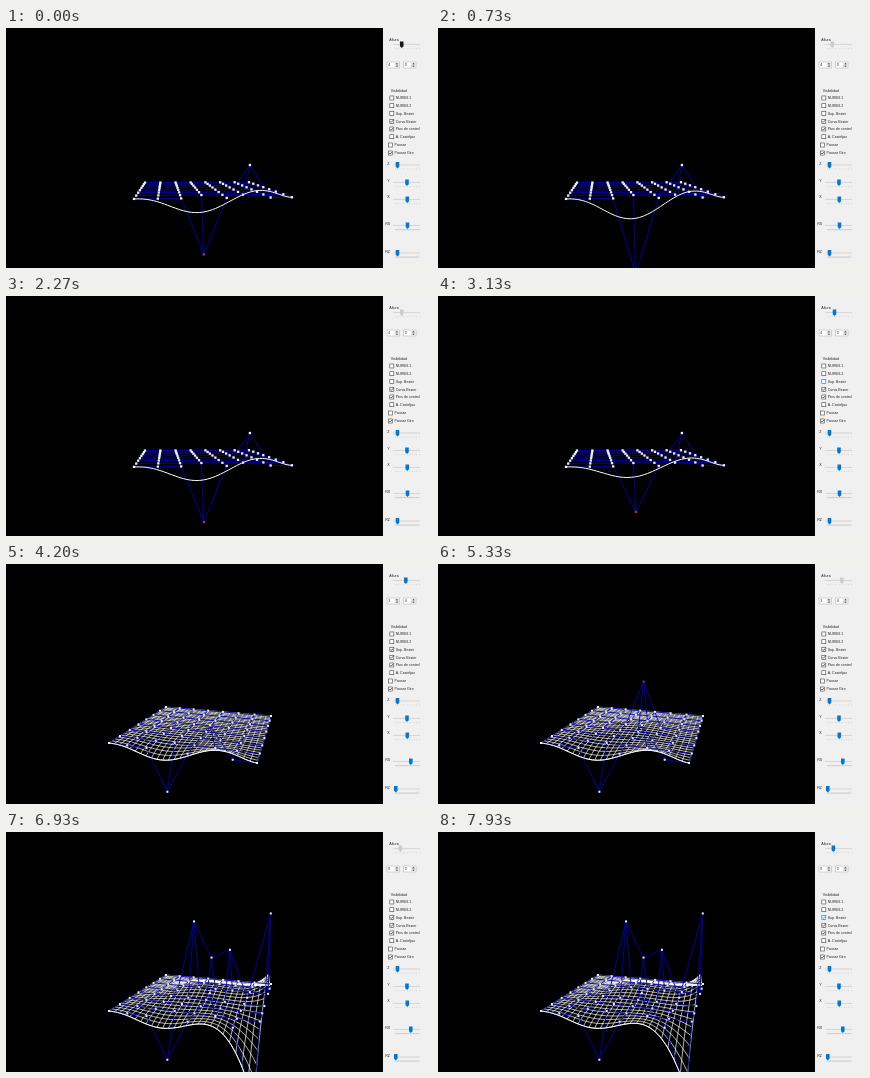
An HTML page with a canvas for the animation above (8000 ms loop, 426x240 px).

```html
<!DOCTYPE html>
<html lang="es">
<head>
<meta charset="utf-8">
<title>Superficie Bezier</title>
<style>
html, body { margin: 0; width: 100%; height: 100%; overflow: hidden; background: #000; }
canvas { display: block; width: 426px; height: 240px; }
</style>
</head>
<body>
<canvas id="stage" width="426" height="240"></canvas>
<script>
const ctx = document.getElementById('stage').getContext('2d');
const LOOP = 8000, STEP = 200 / 3, N = 8, DIV = 25, PANEL = 377;
const BLUE = '#0078d7';

// Plane corners: front left, front right, back right, back left
const VIEW_A = [[128, 170.9], [286, 169.3], [243, 154.2], [139, 154.6]];
const VIEW_B = [[103, 179], [251, 199], [265, 152], [160, 143]];

// Height of each moved control point: column, row, [time, height] keys
const MOVES = [
  { u: 3, v: 0, keys: [[200, -57], [700, -80], [1300, -100], [1500, -100], [2100, -62], [2600, -46]] },
  { u: 5, v: 0, keys: [[0, 32]] },
  { u: 4, v: 4, keys: [[4600, 0], [5250, 57], [5350, 57], [5480, 47]] },
  { u: 3, v: 4, keys: [[5600, 0], [5880, 91]] },
  { u: 5, v: 4, keys: [[6000, 0], [6220, 58]] },
  { u: 7, v: 4, keys: [[6330, 0], [6600, 102]] },
  { u: 7, v: 0, keys: [[6720, 0], [6900, -92], [7000, -92], [7300, -62]] }
];

// [start, index into MOVES, drag start, drag end]
const PICKS = [
  [0, 0, 200, 2650], [3900, 2, 4600, 5480], [5530, 3, 5600, 5900],
  [5930, 4, 6000, 6240], [6270, 5, 6330, 6620], [6660, 6, 6720, 7350]
];
const SURFACE_ON = 3200;

function track(keys, t) {
  if (t <= keys[0][0]) return keys[0][1];
  for (let i = 1; i < keys.length; i++) {
    const [t0, a] = keys[i - 1], [t1, b] = keys[i];
    if (t < t1) return a + (b - a) * (t - t0) / (t1 - t0);
  }
  return keys[keys.length - 1][1];
}

// Perspective projection of the plane, with heights lifted along screen y
function camera(q, scale) {
  const [[x0, y0], [x1, y1], [x2, y2], [x3, y3]] = q;
  const ax = x1 - x2, ay = y1 - y2, bx = x3 - x2, by = y3 - y2;
  const sx = x0 - x1 + x2 - x3, sy = y0 - y1 + y2 - y3;
  const den = ax * by - bx * ay;
  const g = (sx * by - bx * sy) / den, h = (ax * sy - sx * ay) / den;
  return (u, v, z) => {
    const w = 1 + g * u + h * v, lift = w - 0.00062 * z;
    const x = (x0 + (x1 - x0 + g * x1) * u + (x3 - x0 + h * x3) * v) / w;
    const y = (y0 + (y1 - y0 + g * y1) * u + (y3 - y0 + h * y3) * v) / w;
    return [188 + (x - 188) * w / lift, 120 + (y - 120) * w / lift - scale * z / lift];
  };
}

const BINOM = [1, 7, 21, 35, 35, 21, 7, 1];
const bern = (i, t) => BINOM[i] * t ** i * (1 - t) ** (7 - i);

function polyline(count, at) {
  ctx.beginPath();
  for (let i = 0; i <= count; i++) ctx.lineTo(...at(i / count));
  ctx.stroke();
}

function drawScene(t, active) {
  const k = track([[3260, 0], [3470, 1]], t);
  const quad = VIEW_A.map((p, i) => p.map((c, j) => c + (VIEW_B[i][j] - c) * k));
  const project = camera(quad, 1.08 - 0.18 * k);
  const moved = MOVES.map(m => ({ u: m.u, v: m.v, z: track(m.keys, t) }));
  const control = (u, v) => {
    const m = moved.find(p => p.u === u && p.v === v);
    return project(u / 7, v / 7, m ? m.z : 0);
  };
  const surface = (s, r) =>
    project(s, r, moved.reduce((z, m) => z + m.z * bern(m.u, s) * bern(m.v, r), 0));

  if (t >= SURFACE_ON) {
    ctx.strokeStyle = '#fff';
    ctx.lineWidth = 0.7;
    for (let i = 0; i <= DIV; i++) {
      polyline(40, a => surface(a, i / DIV));
      polyline(40, a => surface(i / DIV, a));
    }
  }

  ctx.lineWidth = 0.9;
  ctx.strokeStyle = '#0000b0';
  for (let i = 0; i < N; i++) {
    polyline(7, a => control(Math.round(a * 7), i));
    polyline(7, a => control(i, Math.round(a * 7)));
  }

  ctx.strokeStyle = '#fff';
  ctx.lineWidth = 1;
  polyline(60, a => surface(a, 0));

  const size = 2.3 - 0.3 * k;
  for (let v = N - 1; v >= 0; v--) {
    for (let u = 0; u < N; u++) {
      const [x, y] = control(u, v);
      ctx.fillStyle = u === active.u && v === active.v ? '#a03068' : '#f0f0ff';
      ctx.fillRect(x - size / 2, y - size / 2, size, size);
    }
  }
}

function text(s, x, y) {
  ctx.fillStyle = '#202020';
  ctx.fillText(s, x, y);
}

function box(x, y, w, h, edge) {
  ctx.fillStyle = '#fff';
  ctx.fillRect(x, y, w, h);
  ctx.lineWidth = 0.6;
  ctx.strokeStyle = edge;
  ctx.strokeRect(x, y, w, h);
}

function slider(label, lx, ly, y, thumb, color = BLUE, ticks = 10) {
  text(label, lx, ly);
  ctx.fillStyle = '#d6d6d6';
  ctx.fillRect(387, y - 0.6, 27, 1.1);
  ctx.fillStyle = '#b4b4b4';
  for (let i = 0; i <= ticks; i++) ctx.fillRect(389 + i * 24 / ticks, y + 3.6, 0.4, 1);
  ctx.fillStyle = color;
  ctx.beginPath();
  ctx.moveTo(thumb - 1.8, y - 3);
  ctx.lineTo(thumb + 1.8, y - 3);
  ctx.lineTo(thumb + 1.8, y + 1.7);
  ctx.lineTo(thumb, y + 3.4);
  ctx.lineTo(thumb - 1.8, y + 1.7);
  ctx.fill();
}

function spinner(x, value) {
  box(x, 34, 12.5, 6, '#b8b8b8');
  text(value, x + 1.2, 37.2);
  ctx.fillStyle = '#e2e2e2';
  ctx.fillRect(x + 7.6, 34.4, 4.5, 5.2);
  ctx.fillStyle = '#404040';
  for (const d of [-1, 1]) {
    ctx.beginPath();
    ctx.moveTo(x + 8.7, 37 + d * 0.7);
    ctx.lineTo(x + 11.1, 37 + d * 0.7);
    ctx.lineTo(x + 9.9, 37 + d * 2.1);
    ctx.fill();
  }
}

function checkbox(label, x, y, on, hover) {
  box(x - 2, y - 2, 4, 4, hover ? BLUE : '#444');
  if (on) {
    ctx.lineWidth = 0.7;
    ctx.strokeStyle = hover ? BLUE : '#222';
    ctx.beginPath();
    ctx.moveTo(x - 1.3, y);
    ctx.lineTo(x - 0.4, y + 1);
    ctx.lineTo(x + 1.4, y - 1.1);
    ctx.stroke();
  }
  text(label, x + 3.9, y + 0.2);
}

function drawPanel(t, pick, active) {
  ctx.fillStyle = '#f0f0f0';
  ctx.fillRect(PANEL, 0, 426 - PANEL, 240);
  ctx.font = '3.6px "Liberation Sans", Arial, sans-serif';
  ctx.textBaseline = 'middle';

  const [, , from, to] = pick;
  const state = t >= from && t < to ? '#ccc' : t < 200 ? '#171717' : BLUE;
  slider('Altura', 383.3, 12, 16.5, 399.8 + track(active.keys, t) / 14, state);
  spinner(381, 7 - active.u);
  spinner(397.5, active.v);

  text('Visibilidad', 384.8, 63.3);
  const hover = t > 3000 && t < 3260 || t > 7750;
  const rows = [
    ['NURBS 1', 385.8, 70], ['NURBS 2', 385.8, 77.7],
    ['Sup. Bezier', 385.8, 85.5, t >= SURFACE_ON, hover],
    ['Curva Bezier', 385.8, 93.3, true], ['Ptos de control', 385.8, 101, true],
    ['A. Casteljau', 385.8, 108.7], ['Pausar', 384.6, 117], ['Pausar Giro', 384.6, 125, true]
  ];
  rows.forEach(r => checkbox(...r));

  slider('Z', 381.3, 135.5, 137, 391.5);
  slider('Y', 381.3, 153, 154.5, 401);
  slider('X', 381.3, 169, 171.5, 401.3);
  slider('RX', 379.2, 196, 197.5, track([[3260, 401.5], [3400, 404.8]], t), BLUE, 40);
  slider('RZ', 379.2, 223.5, 225, track([[3330, 391.5], [3470, 389.8]], t), BLUE, 40);
}

function frame(now) {
  const t = Math.floor((now % LOOP) / STEP + 0.001) * STEP;
  const pick = PICKS.filter(p => p[0] <= t).pop();
  const active = MOVES[pick[1]];
  ctx.fillStyle = '#000';
  ctx.fillRect(0, 0, 426, 240);
  drawScene(t, active);
  drawPanel(t, pick, active);
  requestAnimationFrame(frame);
}
requestAnimationFrame(frame);
</script>
</body>
</html>
```
